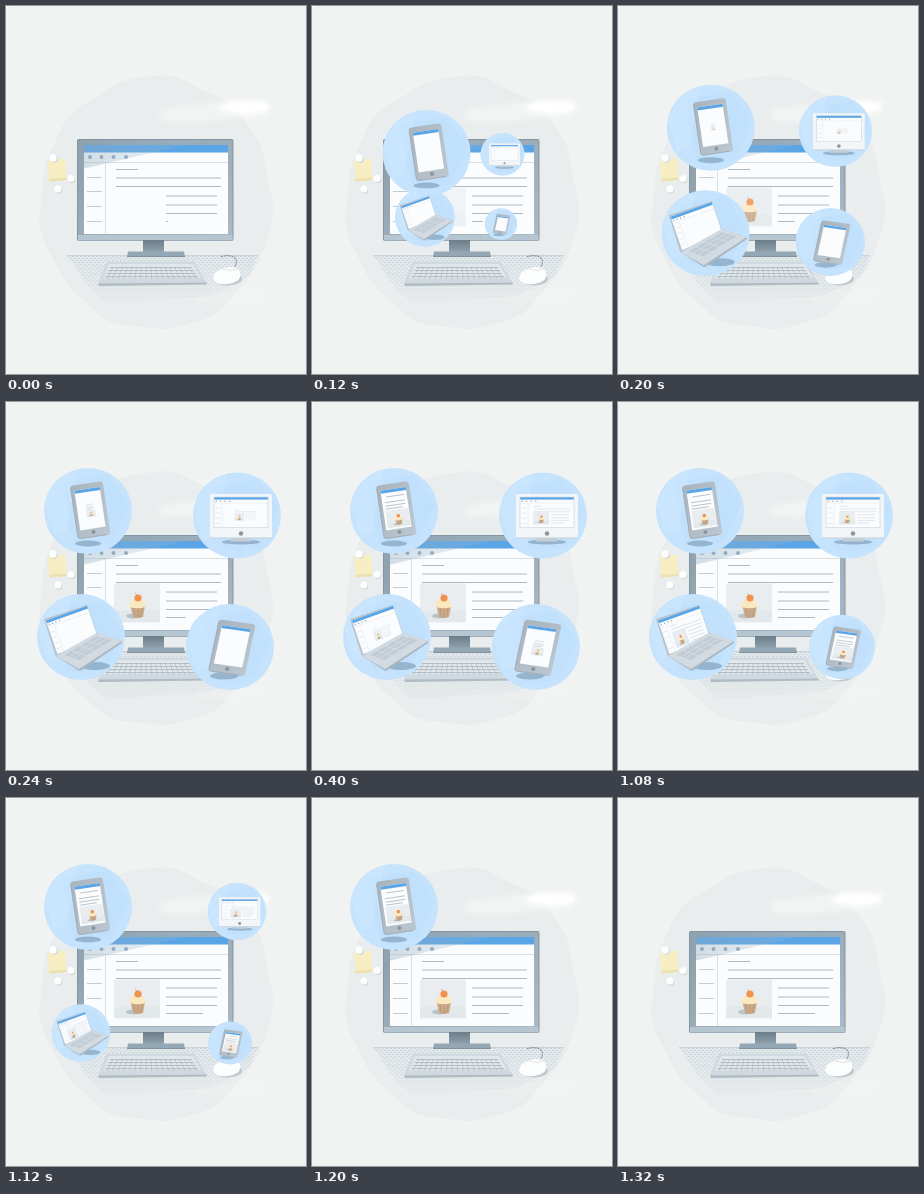
An HTML page for the animation above (3.32 s loop, 300 px wide and 368 px high).

```html
<!DOCTYPE html>
<html lang="en">
<head>
<meta charset="utf-8">
<title>One document, many screens</title>
<style>
  html, body { margin: 0; width: 100%; height: 100%; overflow: hidden; background: #fff; }
  svg { display: block; width: 100vw; height: 100vh; }
  .shade { fill: #7e9cb5; opacity: .65; }
  .glass { fill: #fafcfe; }
  .bar { fill: #5aa5e6; }
  .line { fill: none; stroke: #b0b8be; }
</style>
</head>
<body>
<svg viewBox="0 0 300 368">
  <defs>
    <linearGradient id="frame" x2="1" y2="1">
      <stop stop-color="#8b9ca8"/><stop offset=".5" stop-color="#9badb9"/><stop offset="1" stop-color="#a9bbc8"/>
    </linearGradient>
    <linearGradient id="metal" x2="1" y2="1">
      <stop stop-color="#a9b3bc"/><stop offset="1" stop-color="#bcc7d1"/>
    </linearGradient>
    <linearGradient id="neck" x2="0" y2="1">
      <stop stop-color="#6b7d89"/><stop offset="1" stop-color="#8fa1ad"/>
    </linearGradient>
    <linearGradient id="glare">
      <stop stop-color="#8fa7b8" stop-opacity=".38"/><stop offset="1" stop-color="#a5c4dc" stop-opacity=".15"/>
    </linearGradient>
    <linearGradient id="deskFade" x2="0" y2="1">
      <stop stop-color="#fff"/><stop offset=".6" stop-color="#999"/><stop offset="1" stop-color="#444"/>
    </linearGradient>
    <mask id="deskMask"><path d="M61 249H252L243 270 205 290 100 297 84 283Z" fill="url(#deskFade)"/></mask>
    <pattern id="grain" width="4" height="4" patternUnits="userSpaceOnUse">
      <path d="M0 .5H1.5M2 2.5H3.5" stroke="#bfccd5" stroke-width=".9"/>
    </pattern>
    <filter id="soft" x="-30%" y="-80%" width="160%" height="260%"><feGaussianBlur stdDeviation="2.5"/></filter>

    <g id="bubble">
      <ellipse rx="44" ry="43" fill="#c5e3fd"/>
      <path d="M-26-29 20-36 41-7 24 31 2 35-14 33Z" fill="#a9d0f5" opacity=".2"/>
      <path d="M-43-8Q-35-34-10-41L-22 20-34 25Z" fill="#cfe8fe" opacity=".4"/>
    </g>

    <!-- document parts, on a 144 x 89 screen -->
    <g id="chrome">
      <rect class="glass" width="144" height="89"/>
      <rect class="bar" width="144" height="7.5"/>
      <path d="M0 17.5H144M21.5 17.5V89" stroke="#d8e0e6" fill="none"/>
      <g fill="#93aabc"><circle cx="6" cy="12" r="2"/><circle cx="17.500" cy="12" r="2"/><circle cx="29.500" cy="12" r="2"/><circle cx="42" cy="12" r="2"/></g>
      <path class="line" d="M3 32.500H18M3 46.500H18M3 61.500H18M3 76.500H18" opacity=".7"/>
    </g>
    <path id="text" class="line" d="M32 24.500H54M32 33H137M32 41.500H137M82 51H133M82 60H133M82 68.500H133"/>
    <g id="picture">
      <rect x="-23" y="-19.500" width="46" height="39" rx="1" fill="#e9edef"/>
      <path d="M-23 9Q-4 5 23 8V18.500H-23Z" fill="#e3e8eb"/>
      <ellipse cx="-4" cy="13" rx="7" ry="2.500" fill="#b9c3ca"/>
      <path d="M-6.500 3H8L6 14Q1 16-4 14Z" fill="#cbaa89"/>
      <path d="M-3 4-2 14M1 4V15M5 4 3.500 14" stroke="#b59373" stroke-width=".7"/>
      <path d="M-7.500 4Q-8.500 0-5-2.500 0-6 5-2.500 9.500 0 8.500 4 1 6.500-7.500 4Z" fill="#fae8c0"/>
      <circle cx="1" cy="-5" r="3.600" fill="#f2924f"/>
      <path d="M0-8-2-10" stroke="#c9a880" fill="none" stroke-width=".8"/>
    </g>
    <g id="article">
      <use href="#text"/>
      <path class="line" d="M82 76.500H119"/>
      <use href="#picture" x="53" y="62"/>
    </g>
    <g id="note">
      <path class="line" d="M-8-14.500H10M-10-9H10M-10-5.500H10M-10-2.500H7" stroke-width=".8"/>
      <use href="#picture" transform="translate(.8 8) scale(.5 .45)"/>
    </g>
    <g id="slate">
      <rect x="-16.500" y="-27" width="33" height="54" rx="3" fill="url(#metal)"/>
      <path d="M-16-24V24Q-16 26.500-13 26.500H13" stroke="#a0abb5" fill="none" stroke-width=".8"/>
      <rect class="glass" x="-12.800" y="-21.500" width="25.600" height="40"/>
      <rect class="bar" x="-12.800" y="-21.500" width="25.600" height="3"/>
      <circle cy="22" r="2" fill="#8a959f"/>
    </g>
  </defs>

  <path d="M4 0H300V368H0V4Q0 0 4 0Z" fill="#f0f3f2"/>
  <path id="disc" fill="#eaeded"/>
  <g fill="#fff" filter="url(#soft)">
    <path d="M152 104Q200 94 266 95L262 108Q205 118 154 115Z" opacity=".4"/>
    <ellipse cx="239" cy="101" rx="25" ry="6.500"/>
    <path d="M185 286 264 282 254 297 196 299Z" opacity=".15"/>
  </g>

  <!-- sticky note and pins -->
  <path d="M42 154 59 152.500 60.500 174 43 175.500Z" fill="#f6edc2"/>
  <path d="M43 173 60.300 171.500 60.500 174 43 175.500Z" fill="#ebe1b0"/>
  <g fill="#d0d5d8"><circle cx="48" cy="153" r="3.800"/><circle cx="65.800" cy="173.500" r="3.600"/><circle cx="52.800" cy="184" r="3.600"/></g>
  <g fill="#fdfefe"><circle cx="47" cy="152" r="3.800"/><circle cx="65" cy="172.500" r="3.600"/><circle cx="52" cy="183" r="3.600"/></g>

  <!-- desk -->
  <g mask="url(#deskMask)">
    <rect x="60" y="248" width="194" height="50" fill="#e1e7ea"/>
    <rect x="60" y="248" width="194" height="50" fill="url(#grain)"/>
  </g>
  <path d="M61 249.500H252" stroke="#c9d3d9"/>

  <!-- computer -->
  <rect x="71.500" y="133.500" width="155.500" height="101" rx="1" fill="url(#frame)" stroke="#8495a1"/>
  <path d="M72 229H226.500V234.500H72Z" fill="#b5c6d1"/>
  <g transform="translate(78 139)">
    <use href="#chrome"/>
    <use href="#text"/>
    <path id="typed" class="line"/>
    <use id="photo" href="#picture" x="53" y="62"/>
  </g>
  <path d="M72 134H200L72 164Z" fill="url(#glare)"/>
  <rect x="137" y="234" width="21" height="12" fill="url(#neck)"/>
  <path d="M122 245.500H178L179 251H121Z" fill="#94a7b4"/>
  <path d="M121 250.500H179" stroke="#7f919d"/>

  <!-- keyboard -->
  <path d="M92 277 200 276 201 278.500 93 280Z" fill="#b0bbc3"/>
  <path d="M101 255.500H188L200 276.500 92 277.500Z" fill="#d0d9df"/>
  <path d="M103 258H186.500L195 271.500 97 272.500Z" fill="#e1e7ea"/>
  <path id="keys" fill="none" stroke="#a3afb8" stroke-width=".7"/>

  <!-- mouse -->
  <path d="M215 251Q221 248 228 251 233 255 228 262" fill="none" stroke="#8a959d" stroke-width="1.200" stroke-dasharray="2 .7"/>
  <ellipse cx="222" cy="273" rx="14" ry="6.500" fill="#bfc9cf"/>
  <path d="M207 272Q209 264 219 262 231 259 234 266 236 274 227 277 209 281 207 272Z" fill="#fcfdfd"/>
  <path d="M217 263Q224 266 232 263" fill="none" stroke="#d5dce0" stroke-width=".8"/>

  <g id="phone">
    <use href="#bubble"/>
    <ellipse class="shade" cy="32.500" rx="13" ry="3"/>
    <g transform="translate(2.200 -.8) rotate(-8.500)">
      <use href="#slate"/>
      <g class="fill"><use href="#note"/></g>
    </g>
  </g>

  <g id="laptop">
    <use href="#bubble"/>
    <ellipse class="shade" cx="14" cy="29" rx="15" ry="4"/>
    <path d="M-37-18 6-32 16-4-25 20Z" fill="#b8c3cd"/>
    <g transform="matrix(.285 -.102 .128 .375 -35 -16.500)">
      <use href="#chrome"/>
      <g class="fill"><use href="#article"/></g>
    </g>
    <path d="M-25 19 16-4 41 4V6L-1 34-3 33Z" fill="#abb7c1"/>
    <path d="M-25 19 16-4 41 4-2 32Z" fill="#d3dbe2"/>
    <path d="M-17 18 16-1 31 3-2 23Z" fill="#c2ccd5"/>
    <path d="M-12 20 21 0M-7 21 26 1.500M-9 14 6 19M-1 9 14 14M7 4 22 9" stroke="#dae1e7" stroke-width=".7"/>
  </g>

  <g id="desktop">
    <use href="#bubble"/>
    <ellipse class="shade" cx="4" cy="26.500" rx="19" ry="2.500"/>
    <path d="M-5 22H13L15 26H-7Z" fill="#c4ced6"/>
    <rect x="-27" y="-21.500" width="62" height="44" rx="2" fill="#f3f6f8"/>
    <path d="M-26.500 22.500H34.500" stroke="#c5cfd7"/>
    <g transform="translate(-23 -18.500) scale(.375 .345)">
      <use href="#chrome"/>
      <g class="fill"><use href="#article" transform="translate(7 4) scale(.93)"/></g>
    </g>
    <rect x="-23" y="-18.500" width="54" height="30.700" fill="none" stroke="#cdd6dd" stroke-width=".7"/>
    <circle cx="4" cy="18" r="2.200" fill="#8a959f"/>
  </g>

  <g id="tablet">
    <use href="#bubble"/>
    <ellipse class="shade" cx="-6" cy="29" rx="14" ry="3.500"/>
    <g transform="translate(1.800 .8) rotate(8) skewX(-4) scale(1.120 .98)">
      <use href="#slate"/>
      <g class="fill"><use href="#note"/></g>
    </g>
  </g>
</svg>
<script>
const LOOP = 3320, STEP = 40;
const get = id => document.getElementById(id);
const ramp = (t, [a, b]) => Math.min(1, Math.max(0, (t - a) / (b - a)));
const mix = (a, b, p) => a + (b - a) * p;

// grow / shrink: bubble scale; fill: page content scaling up from its centre
const wide = [84, 53], mid = [0, 0];
const devices = [
  { id: 'phone', from: [147, 185], to: [82, 109], grow: [0, 120], shrink: [1200, 1320], fill: [160, 360], pivot: mid },
  { id: 'laptop', from: [151, 188], to: [75, 235], grow: [0, 176], shrink: [1080, 1200], fill: [240, 520], pivot: wide },
  { id: 'desktop', from: [150, 183], to: [231, 113.5], grow: [0, 240], shrink: [1080, 1200], fill: [120, 320], pivot: wide },
  { id: 'tablet', from: [154, 191], to: [224, 245], grow: [50, 240], shrink: [1040, 1200], fill: [220, 600], pivot: mid }
];
for (const d of devices) {
  d.el = get(d.id);
  d.page = d.el.querySelector('.fill');
}

function place(el, x, y, s, [px, py]) {
  el.style.display = s > 0 ? '' : 'none';
  el.setAttribute('transform', `translate(${x} ${y}) scale(${s}) translate(${-px} ${-py})`);
}

function drawDisc() {
  let path = '';
  for (let i = 0; i < 120; i++) {
    const a = i * Math.PI / 60;
    const r = 116 + 1.3 * Math.sin(7 * a) + Math.sin(13 * a + 1);
    path += `${i ? 'L' : 'M'}${150 + r * Math.cos(a)} ${197 + 1.09 * r * Math.sin(a)}`;
  }
  get('disc').setAttribute('d', path + 'Z');
}

function drawKeys() {
  let path = '';
  for (let row = 0; row < 4; row++) {
    const y = 261.5 + row * 3, left = 104 - row * 1.6, right = 186 + row * 2;
    path += `M${left} ${y}H${right}`;
    for (let i = 0; i < 17; i++) {
      path += `M${mix(left, right, (i + .5) / 17)} ${y}l${mix(-.6, .7, i / 16)} 2`;
    }
  }
  get('keys').setAttribute('d', path);
}

function draw(t) {
  get('typed').setAttribute('d', `M82 76.500H${mix(84, 119, ramp(t, [0, 480]))}`);
  get('photo').setAttribute('opacity', ramp(t, [0, 240]));
  const travel = ramp(t, [0, 240]);
  for (const d of devices) {
    const scale = ramp(t, d.grow) * (1 - ramp(t, d.shrink));
    place(d.el, mix(d.from[0], d.to[0], travel), mix(d.from[1], d.to[1], travel), scale, mid);
    place(d.page, ...d.pivot, ramp(t, d.fill), d.pivot);
  }
}

function tick() {
  let t = Math.floor(performance.now() % LOOP / STEP) * STEP;
  if (t === 1240) t = 1200; // this pose holds for two steps
  draw(t);
  requestAnimationFrame(tick);
}

drawDisc();
drawKeys();
tick();
</script>
</body>
</html>
```
